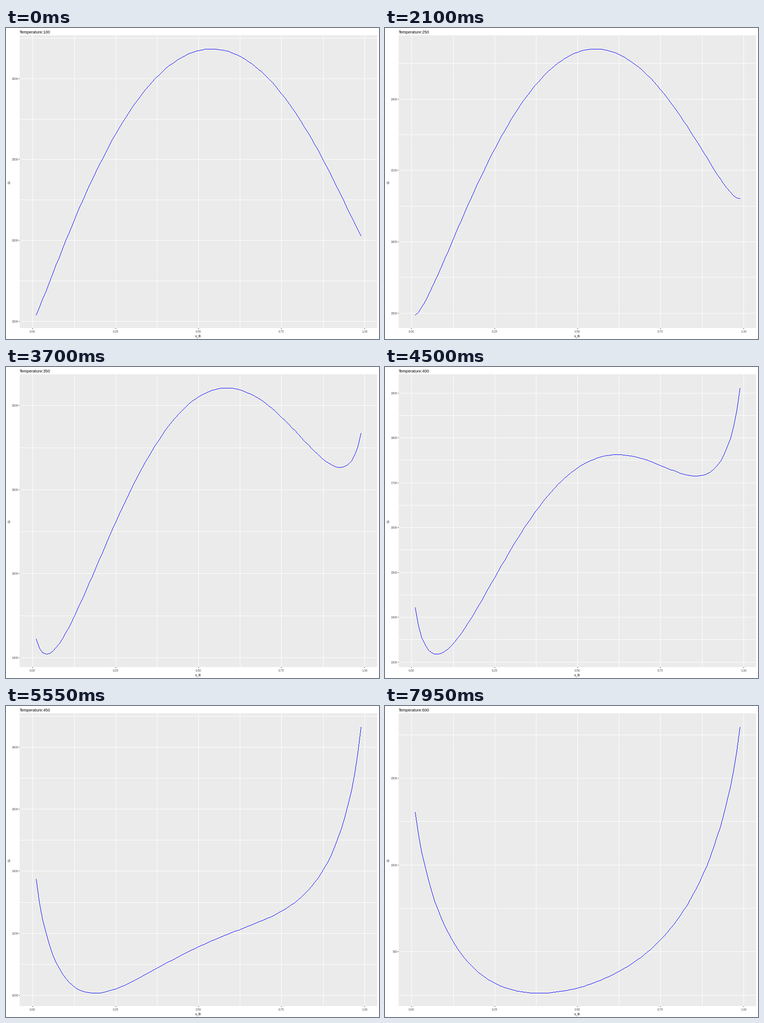
Write a matplotlib script that moves like this. It is 820 by 683 pixels and loops after 8 s.

```python
import numpy as np
import matplotlib.pyplot as plt
from matplotlib.animation import FuncAnimation
from matplotlib.collections import PolyCollection
from matplotlib.patches import Rectangle

W, H, DPI = 820, 683, 64
PX = 72 / DPI                      # one pixel in points
LEFT, RIGHT, TOP, BOTTOM = 29.9, 816.2, 16.4, 659.4
LOOP, TICK = 8000, 50              # ms
STEP = 800                         # ms per temperature

# spacing of the labelled G values at 100, 150, ... 600 K
G_STEPS = [500, 500, 300, 200, 200, 100, 200, 200, 250, 500, 500]
TEMPS = [100 + 50 * k for k in range(len(G_STEPS))]

G_A, G_B, OMEGA, R = 1500, 2000, 8000, 8.314
x = np.arange(1, 100) / 100

plt.rcParams["font.family"] = "Liberation Sans"
fig = plt.figure(figsize=(W / DPI, H / DPI), dpi=DPI, facecolor="white")
ax = fig.add_axes([0, 0, 1, 1])
ax.set_xlim(0, W)
ax.set_ylim(H, 0)
ax.axis("off")


def free_energy(temp):
    mixing = x * np.log(x) + (1 - x) * np.log(1 - x)
    return (1 - x) * G_A + x * G_B + OMEGA * x * (1 - x) + R * temp * mixing


def scale(values, start, end):
    """Map from values to whole pixels, with 5 % room on both sides."""
    lo, hi = values.min(), values.max()
    room = 0.05 * (hi - lo)
    lo, hi = lo - room, hi + room

    def to_px(v):
        return np.rint(start + (np.asarray(v) - lo) / (hi - lo) * (end - start))

    return to_px, lo, hi


def label(px, py, text, size, color="black", **kw):
    return ax.text(px, py, text, fontsize=size * PX, color=color, **kw)


def h_lines(rows, x0, x1, color):
    return ax.hlines(rows + 0.5, x0, x1, colors=color, linewidths=PX, snap=False)


def v_lines(cols, y0, y1, color):
    return ax.vlines(cols + 0.5, y0, y1, colors=color, linewidths=PX, snap=False)


def hard_line(px, py, color):
    """A one pixel wide line without soft edges, built from unit squares."""
    cells = []
    for x0, y0, x1, y1 in zip(px, py, px[1:], py[1:]):
        n = int(max(abs(x1 - x0), abs(y1 - y0))) + 1
        cells.append(np.column_stack([np.linspace(x0, x1, n), np.linspace(y0, y1, n)]))
    cells = np.unique(np.rint(np.concatenate(cells)), axis=0)
    square = np.array([[0, 0], [1, 0], [1, 1], [0, 1]])
    line = PolyCollection(cells[:, None] + square, facecolors=color,
                          edgecolors="none", linewidths=0, snap=False, zorder=3)
    return ax.add_collection(line, autolim=False)


def draw_stage(temp, step):
    """All parts that belong to one temperature."""
    g = free_energy(temp)
    to_y, lo, hi = scale(g, BOTTOM, TOP)
    grid = np.arange(np.ceil(2 * lo / step), np.floor(2 * hi / step) + 1) * step / 2
    major = grid[grid % step == 0]
    parts = [h_lines(to_y(grid), 30, 816, "white"),
             h_lines(to_y(major), 28, 30, "#333333"),
             hard_line(to_x(x), to_y(g), "blue")]
    for v in major:
        parts.append(label(27.3, to_y(v) + 3, f"{v:.0f}", 6.5, "#4d4d4d", ha="right"))
    return parts


# fixed parts
ax.add_patch(Rectangle((30, 16), 786, 643, fc="#ebebeb", ec="none"))
to_x, _, _ = scale(x, LEFT, RIGHT)
x_major = np.linspace(0, 1, 5)
v_lines(to_x(np.linspace(0, 1, 9)), 16, 659, "white")
v_lines(to_x(x_major), 659, 661, "#333333")
for v in x_major:
    label(to_x(v) + 0.5, 669, f"{v:.2f}", 6.5, "#4d4d4d", ha="center")
label(423, 678, "x_B", 7.6, ha="center")
label(8, 339, "G", 7.6, rotation=90, ha="center", va="center")
title = label(29.6, 12, "", 8.9)

stages = [draw_stage(t, s) for t, s in zip(TEMPS, G_STEPS)]


def steps_since(ms, first):
    return max(0, (ms - first) // STEP + 1)


def update(i):
    ms = i * TICK
    # the title runs ahead of the curve
    title.set_text(f"Temperature:{TEMPS[steps_since(ms, 500)]}")
    shown = steps_since(ms, 750)
    for k, parts in enumerate(stages):
        for part in parts:
            part.set_visible(k == shown)
    return []


anim = FuncAnimation(fig, update, frames=LOOP // TICK, interval=TICK,
                     repeat=True, repeat_delay=0, blit=False)
plt.show()
```
